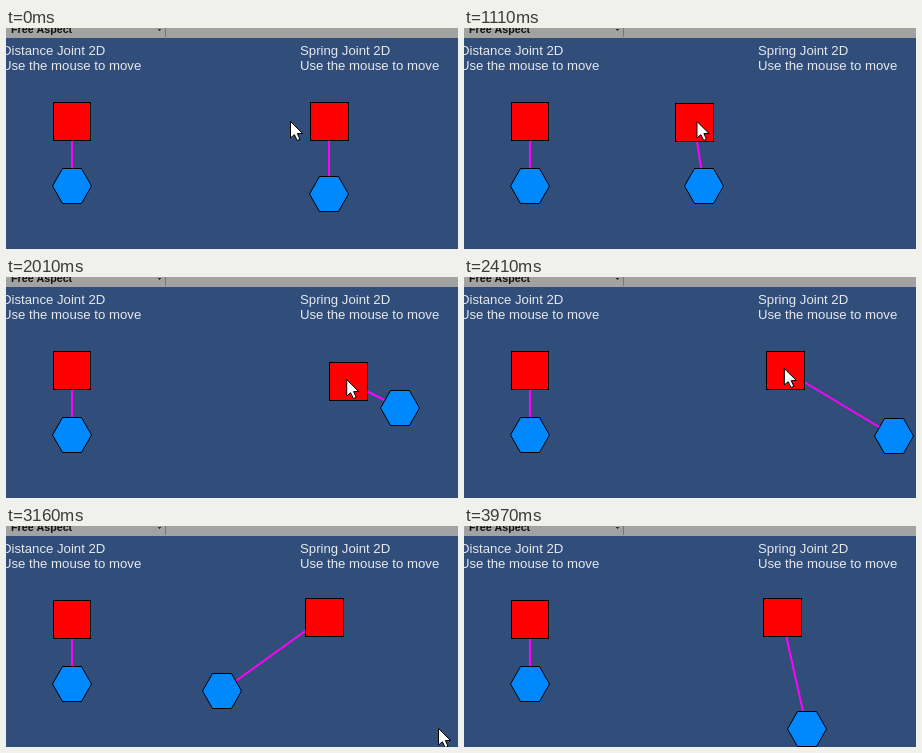
Write an HTML page with a canvas that moves like this. It is 452 px wide and 221 px high and loops after 3.99 s.

```html
<!DOCTYPE html>
<html lang="en">
<head>
<meta charset="utf-8">
<title>2D joints</title>
<style>
  html, body { margin: 0; overflow: hidden; background: #314d79; }
  canvas { display: block; }
</style>
</head>
<body>
<canvas id="stage" width="452" height="221"></canvas>
<script>
const ctx = document.getElementById('stage').getContext('2d');
const LOOP = 3990;
const FONT = '"Liberation Sans", Arial, sans-serif';

// The picture updates every 120 ms; a few updates come 30 ms late.
const lateSteps = [5, 11, 15, 16, 19, 25, 26, 29];
const ticks = [0];
for (let n = 0; n < 31; n++) ticks.push(ticks[n] + (lateSteps.includes(n) ? 150 : 120));

// Drag of the box and swing of the hexagon: [time, x, y]
const boxPath = [[400, 323, 93], [600, 269, 96], [1020, 228, 94], [1350, 258, 95],
  [1500, 313, 99], [1860, 342, 104], [2010, 342, 104], [2550, 318, 91]];
const hexPath = [[480, 323, 166], [600, 322, 166], [990, 268, 155], [1230, 215, 165],
  [1500, 199, 181], [1860, 335, 118], [2010, 394, 131], [2320, 434, 154], [2550, 395, 161],
  [2790, 269, 135], [3050, 201, 177], [3450, 303, 110], [3690, 329, 163], [3960, 343, 203]];

// Smooth curve through the keys, at rest at both ends.
function at(path, t) {
  const i = path.findIndex(key => key[0] > t);
  if (i < 1) return path.at(i).slice(1);
  const slope = (k, axis) => {
    const a = path[k - 1], b = path[k + 1];
    return a && b ? (b[axis] - a[axis]) / (b[0] - a[0]) : 0;
  };
  const from = path[i - 1], to = path[i];
  const span = to[0] - from[0], s = (t - from[0]) / span;
  const blend = s * s * (3 - 2 * s);
  return [1, 2].map(axis => from[axis] + (to[axis] - from[axis]) * blend
    + span * s * (1 - s) * ((1 - s) * slope(i - 1, axis) - s * slope(i, axis)));
}

// The pointer approaches, pulls slightly ahead of the box, then leaves.
function cursorAt(t) {
  if (t < 360) return [285 + t * 0.11, 94];
  if (t >= 3150) return [433, 203];
  const [x, y] = at(boxPath, t + 45);
  return [x + 1, y];
}

function polygon(x, y, points, fill) {
  ctx.beginPath();
  points.forEach(([dx, dy]) => ctx.lineTo(x + dx, y + dy));
  ctx.closePath();
  ctx.fillStyle = fill;
  ctx.fill();
  ctx.strokeStyle = '#000';
  ctx.lineWidth = 1;
  ctx.stroke();
}

function rect(x, y, w, h, color) {
  ctx.fillStyle = color;
  ctx.fillRect(x, y, w, h);
}

function text(str, x, y, font, color) {
  ctx.font = `${font} ${FONT}`;
  ctx.fillStyle = color;
  ctx.fillText(str, x, y);
}

const hexagon = [[-19.5, 0], [-9.5, -17.5], [9.5, -17.5], [19.5, 0], [9.5, 17.5], [-9.5, 17.5]];
const arrow = [[-0.5, -0.5], [-0.5, 16], [3.4, 12.7], [6.2, 18.5], [9, 17.3], [6.4, 11.6], [11.5, 11.5]];

function joint(box, hex, width = 39) {
  const [bx, by] = box.map(Math.round), [hx, hy] = hex.map(Math.round);
  ctx.strokeStyle = '#ff00ff';
  ctx.lineWidth = 2;
  ctx.beginPath();
  ctx.moveTo(bx, by + 0.5);
  ctx.lineTo(hx, hy);
  ctx.stroke();
  rect(bx - 19, by - 19, width, 39, '#000');
  rect(bx - 18, by - 18, width - 2, 37, '#f00');
  polygon(hx, hy, hexagon, '#0088ff');
}

function toolbar() {
  rect(0, 0, 452, 10, '#a2a2a2');
  rect(159, 0, 1, 9, '#777');
  text('Free Aspect', 5, 5, 'bold 10.7px', '#111');
  rect(152, 1, 3, 1, '#333');
  rect(153, 2, 1, 1, '#333');
}

function label(title, x) {
  text(title, x, 27, '13.2px', '#e6e9ee');
  text('Use the mouse to move', x, 42, '13.2px', '#e6e9ee');
}

function draw(now) {
  const time = now % LOOP;
  const t = ticks.findLast(tick => tick <= time);
  rect(0, 0, 452, 221, '#314d79');
  toolbar();
  label('Distance Joint 2D', -4);
  label('Spring Joint 2D', 294);
  joint([66, 93], [66, 158], 38);
  joint(at(boxPath, t), at(hexPath, t));
  if (t < 3300) polygon(...cursorAt(t), arrow, '#fff');
}

const start = performance.now();
function loop() {
  draw(performance.now() - start);
  requestAnimationFrame(loop);
}
loop();
</script>
</body>
</html>
```
